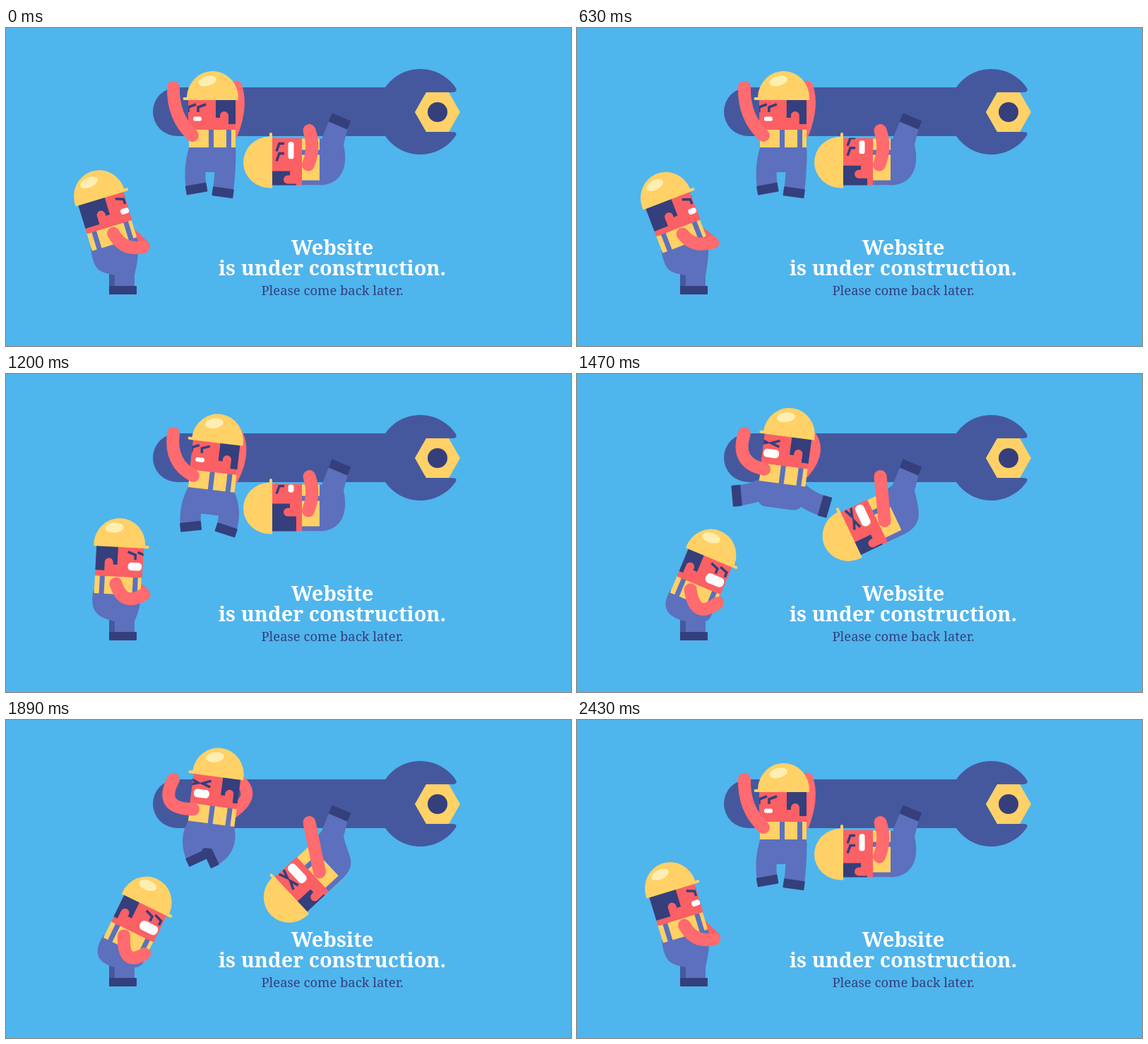
An HTML page with a canvas for the animation above (2700 ms loop, 800 by 450 pixels).

```html
<!DOCTYPE html>
<html lang="en">
<head>
<meta charset="utf-8">
<title>Under construction</title>
<style>
  html, body { margin: 0; width: 100%; height: 100%; overflow: hidden; background: #4fb5ed; }
  canvas { display: block; }
</style>
</head>
<body>
<canvas id="stage" width="800" height="450"></canvas>
<script>
const ctx = document.getElementById('stage').getContext('2d');
const LOOP = 2700, STEP = 30;
const SKY = '#4fb5ed', STEEL = '#45589e', PANTS = '#5c70bd', NAVY = '#343f7c', YELLOW = '#ffd166',
      SHINE = '#feeeb2', FACE = '#fb6064', ARM = '#ff6b6e', WHITE = '#fff';

const rad = deg => deg * Math.PI / 180;

function ease(t, from, to) {
  const u = Math.min(1, Math.max(0, (t - from) / (to - from)));
  return u * u * (3 - 2 * u);
}

// Rises from a to b, holds, and falls from c to d.
const pulse = (t, a, b, c, d) => ease(t, a, b) - ease(t, c, d);

// Adds weighted offsets to a base pose.
const blend = (base, ...moves) =>
  base.map((v, i) => moves.reduce((sum, [weight, offset]) => sum + weight * offset[i], v));

function fill(color, path) {
  ctx.fillStyle = color;
  ctx.fill(new Path2D(path));
}

function stroke(color, width, path, cap = 'round') {
  ctx.strokeStyle = color;
  ctx.lineWidth = width;
  ctx.lineCap = cap;
  ctx.stroke(new Path2D(path));
}

function box(color, x, y, w, h, r = 0) {
  ctx.fillStyle = color;
  ctx.beginPath();
  ctx.roundRect(x, y, w, h, r);
  ctx.fill();
}

function oval(color, x, y, rx, ry = rx, turn = 0) {
  ctx.fillStyle = color;
  ctx.beginPath();
  ctx.ellipse(x, y, rx, ry, rad(turn), 0, 7);
  ctx.fill();
}

function placed({ x, y, angle }, draw, flip = 1) {
  ctx.save();
  ctx.translate(x, y);
  ctx.rotate(rad(angle));
  ctx.scale(flip, 1);
  draw();
  ctx.restore();
}

// Maps a point of the body to the stage.
function joint({ x, y, angle }, px, py) {
  const c = Math.cos(rad(angle)), s = Math.sin(rad(angle));
  return [x + px * c - py * s, y + px * s + py * c];
}

function eye(x, squint, side) {
  const mix = (open, shut) => open + (shut - open) * squint;
  const px = (open, shut) => x + mix(open, shut * side);
  stroke(NAVY, 3.5, `M${px(-8, -6)} ${mix(-35, -34)}L${px(3, 6)} ${mix(-31, -29)}L${px(3, -6)} ${mix(-24, -25)}`, 'butt');
}

// Vest, head and helmet, facing right; the origin is the middle of the neckline.
function torso(body, { hair, mouthW, mouthH, squint }, straps, shine, flip = 1) {
  placed(body, () => {
    box(YELLOW, -33, 0, 66, 26);
    for (const s of straps) box(PANTS, s, 0, 7, 26.5);
    ctx.save();
    ctx.beginPath();
    ctx.rect(-33, -44, 67, 45);
    ctx.clip();
    box(FACE, -33, -44, 67, 45);
    fill(NAVY, `M-34-44H${hair}V-16H${hair - 6}V-19a6 6 0 0 0-12 0V-7H-34Z`);
    eye(hair + 22, squint, 1);
    eye(hair + 36 + 4 * squint, squint, -1);
    box(WHITE, 24 + .6 * hair - mouthW / 2, -14.5 - mouthH / 2, mouthW, mouthH, Math.min(mouthW, mouthH) * .42);
    ctx.restore();
    fill(YELLOW, 'M-37-41V-43A36.5 38 0 0 1 36-45H39.5a2 2 0 0 1 0 4Z');
    if (shine) oval(SHINE, shine, -68, 13, 7, shine > 0 ? 14 : -6);
  }, flip);
}

function wrench() {
  box(STEEL, 208, 84, 370, 69, [34.5, 0, 0, 34.5]);
  fill(STEEL, 'M631 91Q640 91 637 85A60.5 60.5 0 1 0 637 152Q640 147 631 147H595L579 119L595 91Z');
  fill(YELLOW, 'M579 119L595 91H627L643 119L627 147H595Z');
  oval(NAVY, 611, 119, 14);
}

// Thigh and shin hang at the given angles; raised thighs look shorter.
function leg([hx, hy], thigh, shin) {
  const reach = 32 - 13 * Math.abs(Math.sin(rad(thigh)));
  const [kx, ky] = joint({ x: hx, y: hy, angle: thigh }, 0, reach);
  const [x, y] = joint({ x: kx, y: ky, angle: shin }, 0, 28);
  stroke(PANTS, 29, `M${hx} ${hy}Q${kx} ${ky} ${x} ${y}`, 'butt');
  placed({ x, y, angle: shin }, () => box(NAVY, -15, -6.5, 30, 13, 1));
}

function hanger(t) {
  const kick = pulse(t, 0, 380, 420, 600), look = pulse(t, 600, 960, 960, 1200);
  const crouch = pulse(t, 960, 1200, 1200, 1470), split = pulse(t, 1200, 1470, 1470, 1890);
  const tuck = pulse(t, 1470, 1890, 1890, 2300), strain = pulse(t, 1150, 1470, 1890, 2230);
  const lift = 17 * pulse(t, 0, 370, 370, 590) + 22 * pulse(t, 900, 1890, 1890, 2230);
  const tilt = pulse(t, 960, 1260, 1890, 2200);
  const body = { x: 292 + 2 * tilt, y: 143 - lift, angle: 7.5 * tilt };
  // Left thigh and shin, right thigh and shin.
  const legs = blend([17, -10, 0, 8],
    [kick, [63, 45, -77, -33]], [look, [-17, -12, -10, -6]], [crouch, [13, 4, -25, 10]],
    [split, [36, 95, -40, -82]], [tuck, [13, -15, -12, 57]]);

  stroke(ARM, 17, `M326 83Q${335 + 1.05 * lift} ${111 - .3 * lift} ${joint(body, 28, 6)}`);
  leg(joint(body, -19, 30), legs[0], legs[1]);
  leg(joint(body, 19, 30), legs[2], legs[3]);
  placed(body, () => box(PANTS, -33, 25, 66, 36, [0, 0, 14, 14]));
  torso(body, {
    hair: -5 + 10 * look - 3 * tuck,
    mouthW: 12 - 8 * kick + 10 * strain,
    mouthH: 6 - 2 * kick + 6 * strain,
    squint: .6 * kick + strain
  }, [-27, -2], 7, -1);
  stroke(ARM, 18, `M237 84Q${236 - .95 * lift} 126 ${joint(body, -28, 9)}`);
}

function pusher(t) {
  const wind = pulse(t, 555, 900, 1020, 1240), sway = pulse(t, 555, 760, 760, 960);
  const push = pulse(t, 1060, 1330, 1890, 2160), squeeze = pulse(t, 1330, 1890, 1890, 2160);
  const body = {
    x: 146 - 3 * wind - 9 * sway + 25 * push + 8 * squeeze,
    y: 281 + 2 * wind + 4 * sway + 17 * push * push + squeeze,
    angle: -17 - 6 * wind - 11 * sway + 39 * push + 4 * squeeze
  };
  const [ex, ey, hx, hy] = blend([166, 316, 194, 310],
    [wind, [-10, -36, -19, -55]], [push, [1, 32, 5, 13]], [squeeze, [-2, 2, -3, 8]]);
  const at = (x, y) => joint(body, x, y).join(' ');

  stroke(FACE, 16, `M${at(22, 10)}L${hx + 1 + 5 * wind} ${hy - 2 + 24 * wind}`);
  box(STEEL, 146, 340, 12, 26);
  box(NAVY, 146, 365, 39, 12, 1);
  fill(PANTS, `M${at(-34, 22)}C${at(-39, 54)} 132 345 154 350V365H182V350Q${at(35, 40)} ${at(33, 25)}Z`);
  torso(body, {
    hair: 6 - 3 * wind - 15 * push,
    mouthW: 12 - 4 * wind + 15 * push,
    mouthH: 8 + 6 * push,
    squint: 0
  }, [-26, 21], -9);
  stroke(ARM, 18, `M${at(3 - 11 * push, 11)}Q${ex} ${ey} ${hx} ${hy}`);
}

function dangler(t) {
  const strain = pulse(t, 1200, 1470, 1960, 2430), look = pulse(t, 420, 900, 1200, 1470);
  const drop = 20 * pulse(t, 0, 400, 420, 600) + 25.5 * strain + 17.5 * pulse(t, 1470, 1890, 1960, 2430);
  // The body swings around the hooked knee.
  const [x, y] = joint({ x: 463.5, y: 184, angle: -drop }, -45.5, 5.5);
  const body = { x, y, angle: -90 - drop };
  const at = (px, py) => joint(body, px, py).join(' ');
  const [sx, sy] = joint(body, -4, 10);

  fill(PANTS, `M${at(-33, 25)}C${at(-33, 58)} 485 195 478 165L485 137L459 127L447 157L${at(33, 25)}Z`);
  placed({ x: 472.5, y: 132, angle: 23 }, () => box(NAVY, -14.5, -6.5, 29, 13, 1));
  torso(body, {
    hair: -13 + 19 * look,
    mouthW: 24 - 13 * look + 8 * strain,
    mouthH: 8 + 5 * strain,
    squint: strain
  }, [-33, 10], 0);
  stroke(ARM, 18, `M429.5 145Q${(429.5 + sx) / 2 + Math.max(0, 9 - .45 * drop)} ${(145 + sy) / 2} ${sx} ${sy}`);
}

function label(text, y, font, color) {
  ctx.font = font + ' "Noto Serif", serif';
  ctx.fillStyle = color;
  ctx.textAlign = 'center';
  ctx.fillText(text, 462, y);
}

function draw(t) {
  ctx.fillStyle = SKY;
  ctx.fillRect(0, 0, 800, 450);
  wrench();
  hanger(t);
  dangler(t);
  pusher(t);
  label('Website', 321, 'bold 28.8px', WHITE);
  label('is under construction.', 350, 'bold 28.8px', WHITE);
  label('Please come back later.', 378, '18.4px', NAVY);
}

const start = performance.now();
function tick() {
  const t = (performance.now() - start) % LOOP;
  draw(Math.floor(t / STEP) * STEP);
  requestAnimationFrame(tick);
}
tick();
</script>
</body>
</html>
```
